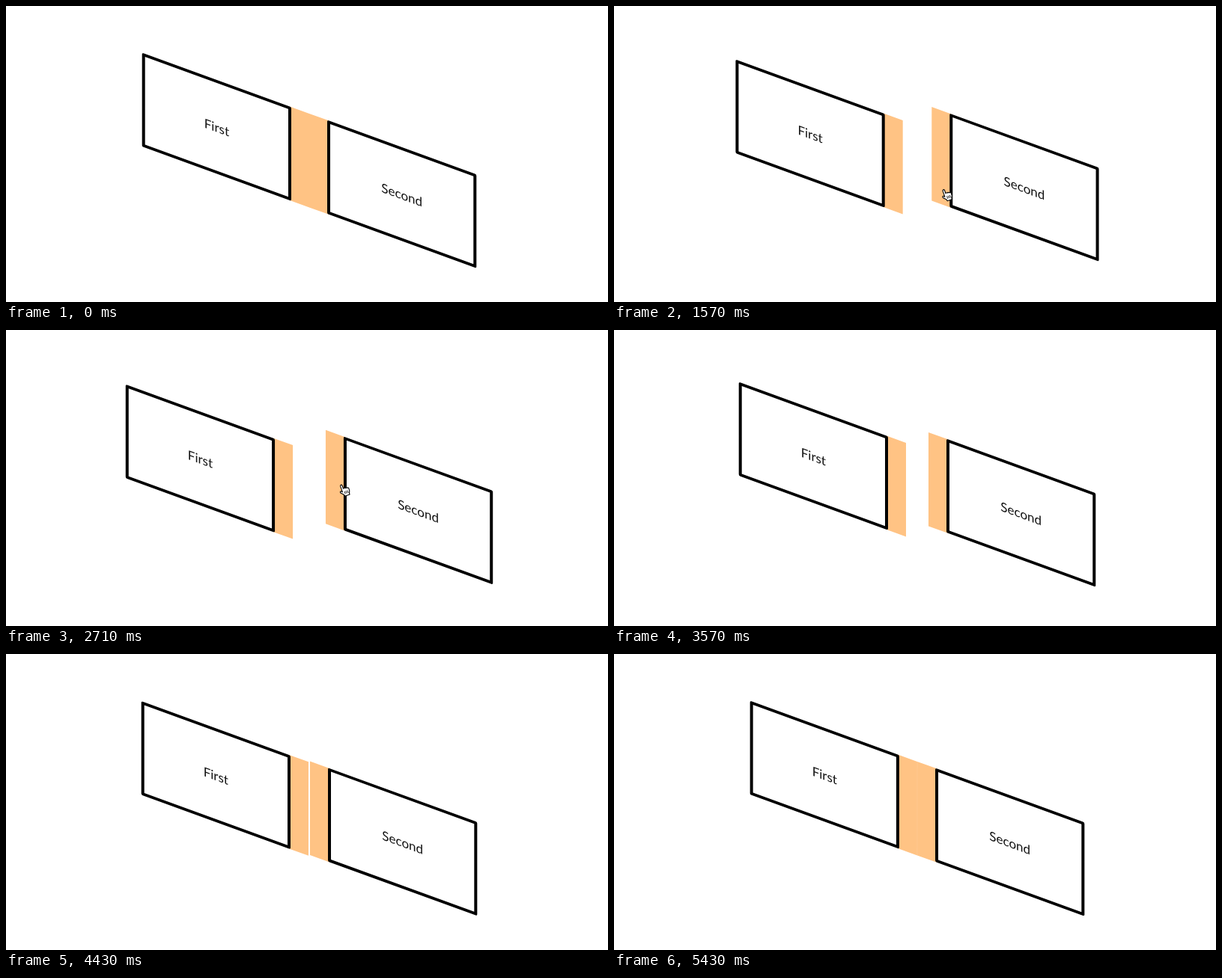
Write an HTML page with a canvas that moves like this. It is 804 px wide and 396 px high and loops after 5570 ms.

```html
<!DOCTYPE html>
<html lang="en">
<head>
<meta charset="utf-8">
<title>Hinged panels</title>
<style>
  html, body { margin: 0; width: 100%; height: 100%; overflow: hidden; background: #fff; }
  canvas { display: block; }
</style>
</head>
<body>
<canvas id="stage" width="804" height="396"></canvas>
<script>
const ctx = document.getElementById('stage').getContext('2d');

const FPS = 7, STEPS = 39, LOOP = 5570;
const SLOPE = Math.tan(20 * Math.PI / 180);
const MID_X = 405, MID_Y = 145.9;
const INNER = 26, OUTER = 221.3, HEIGHT = 121.5, LINE = 4;
const TRAVEL = 22, RISE = 0.466, RATE = 3.15;
const OPEN_AT = 0.907, CLOSE_AT = 3.45;

// Pointer path: step, x, y
const PATH = [
  [6, 459, 370], [7, 457, 284], [8, 451, 267], [9, 447, 258],
  [11, 444.5, 252.5], [15, 447, 233], [19, 452, 214],
  [20, 448, 236], [21, 442, 285], [22, 442, 357]
];

function spread(sec) {
  if (sec < OPEN_AT) return 0;
  if (sec < CLOSE_AT) return TRAVEL * (1 - Math.exp(-RATE * (sec - OPEN_AT)));
  return TRAVEL * Math.exp(-RATE * (sec - CLOSE_AT));
}

// side is -1 for the left panel and 1 for the right one
function panel(side, label, gap) {
  const w = OUTER - INNER;
  const left = side < 0 ? -OUTER : INNER;
  ctx.save();
  ctx.translate(MID_X + side * gap, MID_Y - side * gap * RISE);
  ctx.transform(1, SLOPE, 0, 1, 0, 0);

  ctx.fillStyle = '#ffc384';
  ctx.fillRect(side < 0 ? -INNER : 0, -LINE / 2, INNER, HEIGHT + LINE);

  ctx.fillStyle = '#fff';
  ctx.fillRect(left, 0, w, HEIGHT);
  ctx.strokeStyle = '#000';
  ctx.lineWidth = LINE;
  ctx.lineJoin = 'round';
  ctx.strokeRect(left, 0, w, HEIGHT);

  ctx.fillStyle = '#111';
  ctx.font = '17px Lato, sans-serif';
  ctx.textAlign = 'center';
  ctx.textBaseline = 'alphabetic';
  ctx.fillText(label, left + w / 2, HEIGHT / 2 + 7);
  ctx.restore();
}

function hand(x, y) {
  ctx.save();
  ctx.translate(x, y);
  ctx.rotate(-0.35);
  ctx.beginPath();
  ctx.moveTo(-3.4, 1.8);
  ctx.lineTo(-3.4, -6.4);
  ctx.quadraticCurveTo(-3.2, -8, -2.1, -8);
  ctx.quadraticCurveTo(-0.9, -8, -0.8, -6.4);
  ctx.lineTo(-0.8, -2.2);
  ctx.quadraticCurveTo(0.6, -3.4, 1.6, -1.9);
  ctx.quadraticCurveTo(3, -2.9, 3.9, -1.3);
  ctx.quadraticCurveTo(5.8, -2, 6.2, 0);
  ctx.lineTo(6, 3.4);
  ctx.lineTo(4.6, 6);
  ctx.lineTo(4.6, 8);
  ctx.lineTo(-2.2, 8);
  ctx.lineTo(-2.6, 6);
  ctx.lineTo(-6.2, 2);
  ctx.quadraticCurveTo(-6.6, -0.4, -4.8, 0.2);
  ctx.closePath();
  ctx.fillStyle = '#fff';
  ctx.fill();
  ctx.strokeStyle = '#000';
  ctx.lineWidth = 1.1;
  ctx.lineJoin = 'round';
  ctx.stroke();

  ctx.beginPath();
  for (const bx of [-0.6, 1.4, 3.4]) {
    ctx.moveTo(bx, 1.8);
    ctx.lineTo(bx, 5.4);
  }
  ctx.lineWidth = 0.8;
  ctx.stroke();
  ctx.restore();
}

function pointer(step) {
  const next = PATH.findIndex(p => p[0] >= step);
  if (next < 0 || step < PATH[0][0]) return;
  const b = PATH[next], a = PATH[Math.max(0, next - 1)];
  const u = b === a ? 1 : (step - a[0]) / (b[0] - a[0]);
  hand(a[1] + (b[1] - a[1]) * u, a[2] + (b[2] - a[2]) * u);
}

function draw(ms) {
  // The motion is shown at seven pictures a second
  const step = Math.min(STEPS - 1, Math.floor(ms * FPS / 1000 + 0.05));
  const gap = spread(step / FPS);
  ctx.fillStyle = '#fff';
  ctx.fillRect(0, 0, 804, 396);
  panel(-1, 'First', gap);
  panel(1, 'Second', gap);
  pointer(step);
}

const start = performance.now();
function tick() {
  draw((performance.now() - start) % LOOP);
  requestAnimationFrame(tick);
}
tick();
</script>
</body>
</html>
```
